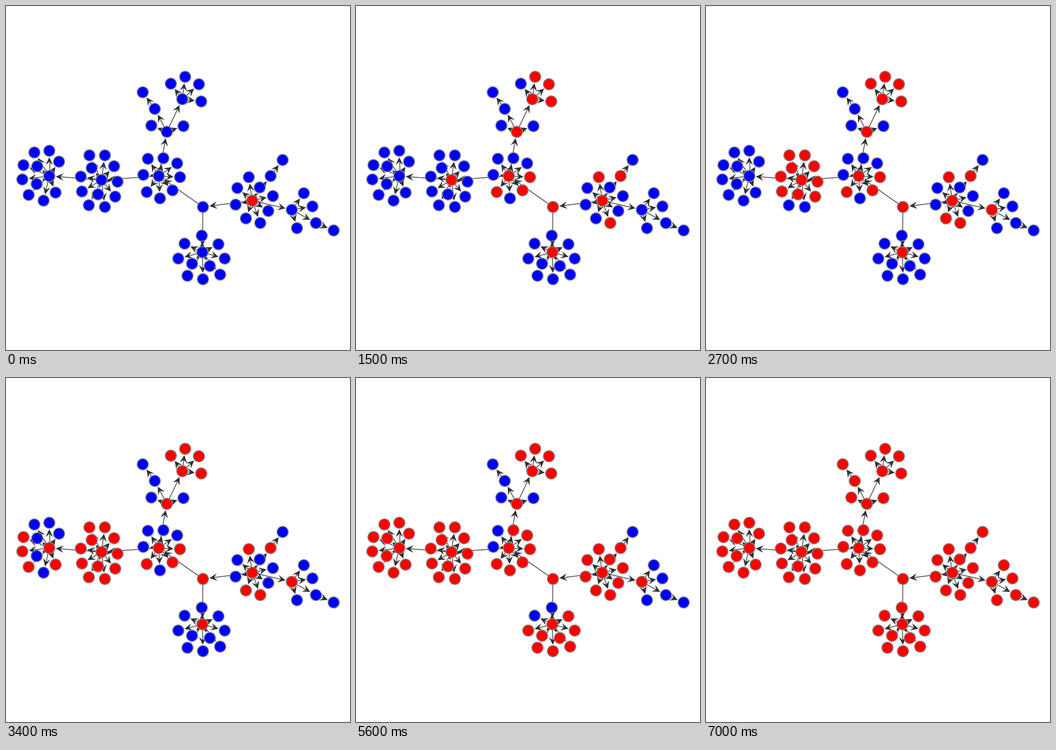
These frames come from a looping animation (600x600 px, 7100 ms). A matplotlib script:

```python
import numpy as np
import matplotlib.pyplot as plt
from matplotlib.animation import FuncAnimation
from matplotlib.collections import LineCollection, PatchCollection, PolyCollection
from matplotlib.patches import Circle

SIZE, DPI = 600, 100
PX = 72 / DPI
INTERVAL = 100
RED, BLUE, RING, EDGE = "#ff0000", "#0000ff", "#8c8c8c", "#2b3033"
TIP_GAP, HEAD = 11.3, 13.5

# Each cluster starts with its hub; the leaves follow in order of infection.
CLUSTERS = {
    "A": [(75, 296), (30, 277), (39, 329), (86, 325), (28, 302), (49, 255),
          (54, 279), (53, 310), (75, 252), (92, 271), (65, 339)],
    "B": [(166, 303), (130, 297), (145, 260), (172, 260), (188, 279), (149, 282),
          (194, 306), (132, 323), (160, 328), (190, 332), (144, 347), (172, 350)],
    "C": [(266, 296), (303, 298), (290, 321), (245, 324), (268, 335),
          (274, 265), (298, 274), (247, 266), (239, 294)],
    "D": [(280, 219), (253, 208), (309, 209)],
    "E": [(307, 162), (312, 123), (336, 136), (340, 166), (287, 135)],
    "F": [(343, 350)],
    "G": [(342, 429), (370, 415), (300, 440), (381, 440), (324, 449), (355, 453),
          (316, 470), (343, 476), (373, 468), (341, 400), (311, 414)],
    "H": [(429, 339), (423, 298), (443, 378), (418, 370), (403, 317),
          (442, 316), (465, 331), (400, 346), (457, 357)],
    "I": [(498, 355), (519, 326), (534, 349), (507, 387)],
    "J": [(461, 296), (482, 268)],
    "K": [(259, 179), (238, 150)],
    "L": [(540, 378), (571, 391)],
}
HUB_LINKS = ["HF", "HI", "HJ", "FC", "FG", "CB", "CD", "BA", "DE", "DK", "IL"]

# One letter per step: the next node of that cluster turns red.
SPREAD = ("H" "HHJFCGBC" "CCDEEEEE" "HI" + "B" * 11 + "A" * 11
          + "C" "HHHHH" "CC" + "G" * 8 + "CCGGDDKJ" "IIILLK")


def infection_order():
    queues = {name: iter(nodes) for name, nodes in CLUSTERS.items()}
    return np.array([next(queues[name]) for name in SPREAD]) + 0.5


def edge_list():
    pairs = [(CLUSTERS[a][0], CLUSTERS[b][0]) for a, b in HUB_LINKS]
    for hub, *leaves in CLUSTERS.values():
        pairs += [(hub, leaf) for leaf in leaves]
    return np.array(pairs) + 0.5


def arrow(start, end):
    """Return the shaft and the notched head of one arrow."""
    along = (end - start) / np.hypot(*(end - start))
    across = np.array([-along[1], along[0]])
    tip = end - TIP_GAP * along
    back = tip - HEAD * along
    notch = tip - 0.6 * HEAD * along
    wing = HEAD * np.tan(np.pi / 7) * across
    return [start, notch], [tip, back + wing, notch, back - wing]


fig = plt.figure(figsize=(SIZE / DPI, SIZE / DPI), dpi=DPI, facecolor="white")
ax = fig.add_axes([0, 0, 1, 1])
ax.set_xlim(0, SIZE)
ax.set_ylim(SIZE, 0)
ax.axis("off")

shafts, heads = zip(*(arrow(a, b) for a, b in edge_list()))
ax.add_collection(LineCollection(shafts, colors=EDGE, linewidths=1.2 * PX, zorder=1))
ax.add_collection(PolyCollection(heads, facecolors=EDGE, edgecolors="none", zorder=2))

order = infection_order()
nodes = PatchCollection([Circle(p, 9.8) for p in order], edgecolor=RING,
                        linewidth=1.5 * PX, zorder=3)
ax.add_collection(nodes)


def update(step):
    infected = step + 1
    nodes.set_facecolor([RED] * infected + [BLUE] * (len(order) - infected))
    return [nodes]


anim = FuncAnimation(fig, update, frames=len(order), interval=INTERVAL,
                     repeat=True, repeat_delay=0, blit=False)
plt.show()
```
